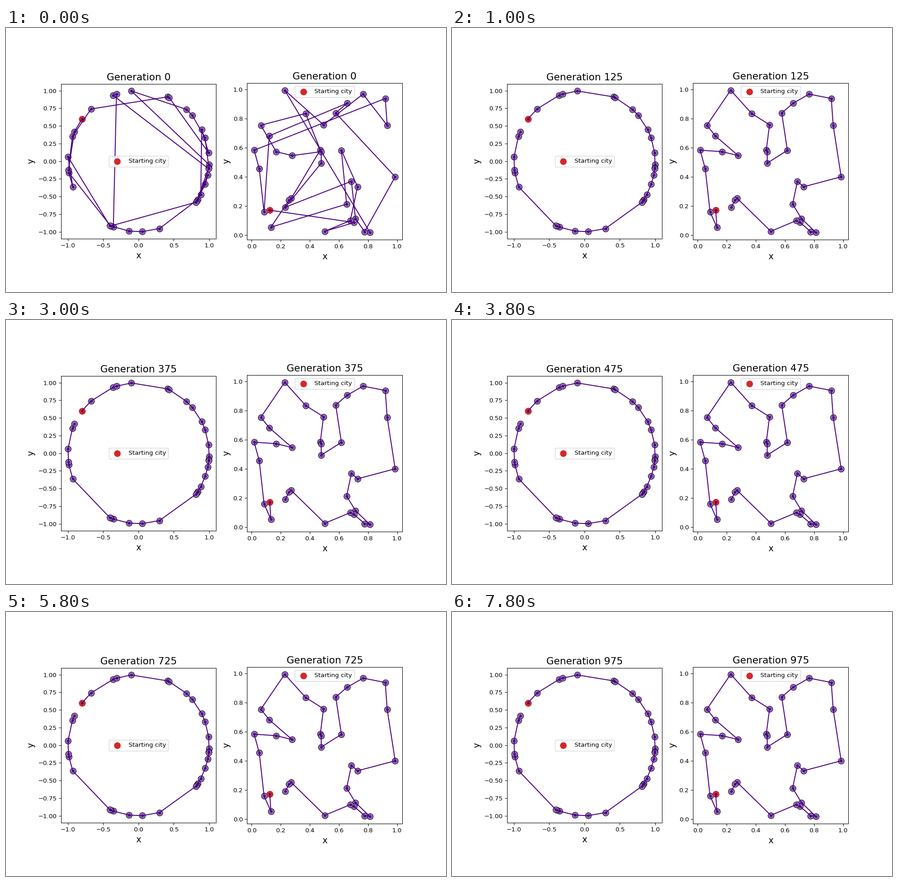
Recreate the animation shown at these times as a matplotlib script. Size 966 px wide and 580 px high, loop 8000 ms.

```python
import numpy as np
import matplotlib.pyplot as plt
from matplotlib.animation import FuncAnimation

plt.rcParams["font.family"] = "DejaVu Sans"

DPI = 96.667
FRAMES, INTERVAL, GEN_STEP = 40, 200, 25
SETTLED = 5  # step at which both tours reach their best order

# Cities are listed along the best tour.
ANGLES = np.radians([
    143.3, 132.3, 111.1, 108.2, 95.8, 65.7, 64.2, 47.2, 40.4, 26.6, 19.6,
    6.8, -2.8, -5.2, -6.2, -11.2, -19.1, -28.1, -32.9, -34.2, -35.6, -72.8,
    -87.2, -97.6, -110.9, -113.3, -114.0, -158.6, -170.6, -172.9, 176.5,
    159.5, 155.4])
RING = np.column_stack([np.cos(ANGLES), np.sin(ANGLES)])

SQUARE = np.array([
    (.124, .170), (.132, .053), (.085, .158), (.052, .455), (.017, .583),
    (.168, .573), (.278, .546), (.121, .682), (.063, .755), (.227, .996),
    (.371, .836), (.494, .758), (.472, .585), (.478, .573), (.478, .494),
    (.617, .582), (.578, .839), (.656, .906), (.766, .969), (.919, .939),
    (.932, .754), (.987, .400), (.728, .331), (.686, .369), (.653, .212),
    (.714, .112), (.813, .017), (.777, .022), (.705, .085), (.678, .098),
    (.503, .025), (.272, .251), (.257, .239), (.232, .191)])


def rough_tour(cities, seed):
    """Random walk over all cities that favours near ones."""
    rng = np.random.default_rng(seed)
    reach = 0.2 * np.ptp(cities)
    order, rest = [0], list(range(1, len(cities)))
    while rest:
        gaps = np.linalg.norm(cities[rest] - cities[order[-1]], axis=1)
        weights = np.exp(-gaps / reach)
        pick = rng.choice(len(rest), p=weights / weights.sum())
        order.append(rest.pop(pick))
    return order


def improve(order, step):
    """Untangle a growing part of the tour by reversing stretches."""
    order = list(order)
    progress = 1 - (1 - min(step / SETTLED, 1)) ** 2
    for i in range(round(progress * len(order))):
        j = order.index(i) + 1
        order[i:j] = order[i:j][::-1]
    return order


class Panel:
    def __init__(self, ax, cities, seed, legend_loc):
        self.cities = cities
        self.first = rough_tour(cities, seed)
        ax.scatter(*cities.T, s=100, c="tab:purple", edgecolors="black",
                   linewidths=0.7)
        ax.scatter(*cities[0], s=100, c="tab:red", linewidths=0.8,
                   label="Starting city")
        self.line, = ax.plot(*cities[self.first].T, ".-", color="indigo")
        self.title = ax.set_title("Generation 0", fontsize=16)
        ax.set_xlabel("x", fontsize=14)
        ax.set_ylabel("y", fontsize=14)
        ax.set_aspect("equal")
        ax.legend(loc=legend_loc)

    def show(self, step):
        order = improve(self.first, step)
        self.line.set_data(*self.cities[order].T)
        self.title.set_text(f"Generation {step * GEN_STEP}")
        return self.line, self.title


fig, (left, right) = plt.subplots(
    1, 2, figsize=(966.01 / DPI, 580.01 / DPI), dpi=DPI)
fig.subplots_adjust(right=0.9005)
panels = [Panel(left, RING, 4, "center"),
          Panel(right, SQUARE, 7, "upper center")]


def update(step):
    return [artist for panel in panels for artist in panel.show(step)]


anim = FuncAnimation(fig, update, frames=FRAMES, interval=INTERVAL,
                     repeat=True, repeat_delay=0, blit=False)
plt.show()
```
